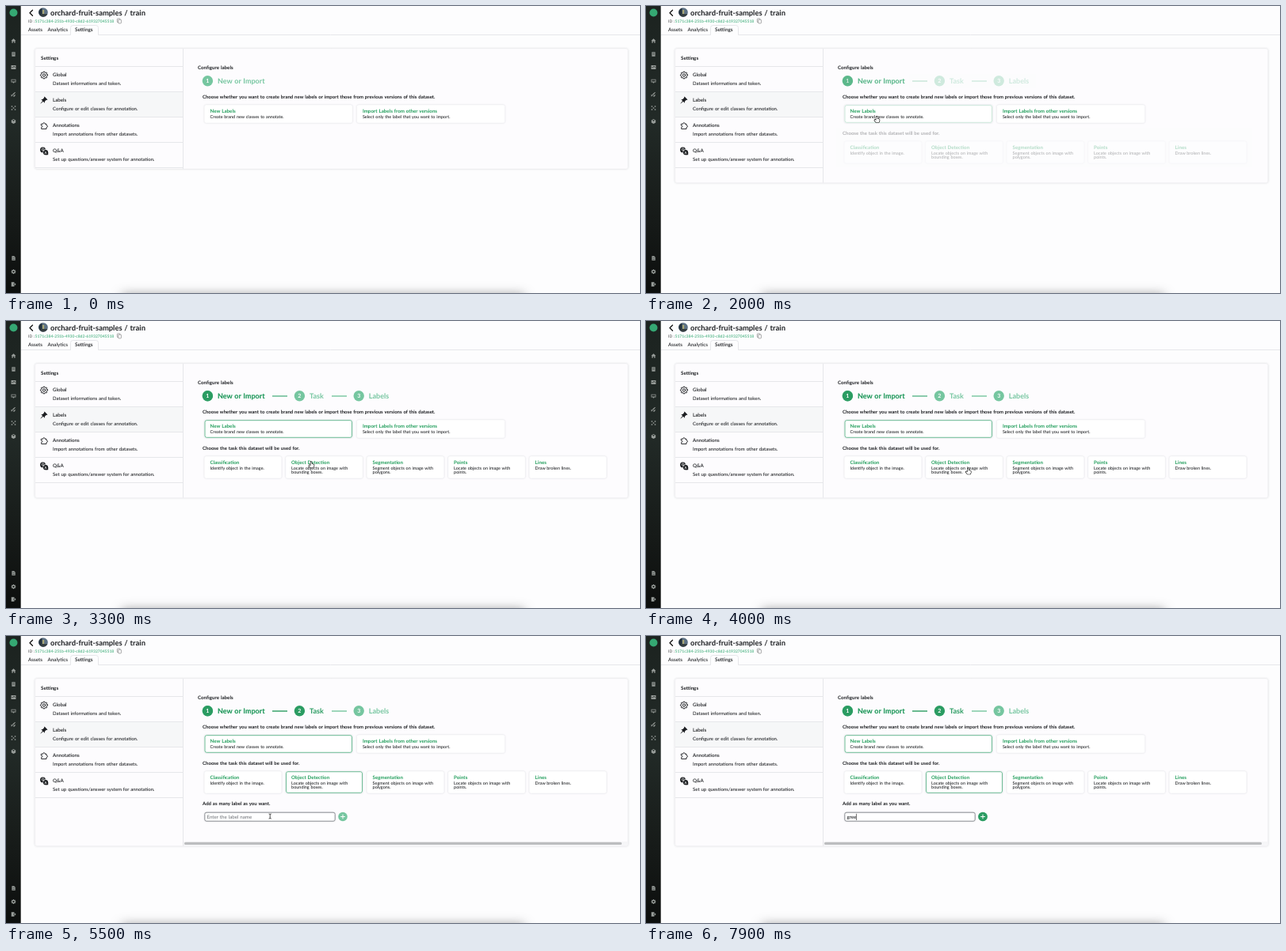
An HTML page with a canvas for the animation above (8 s loop, 800 by 363 pixels).

```html
<!DOCTYPE html>
<html lang="en">
<head>
<meta charset="utf-8">
<title>Label setup</title>
<style>
html, body { margin: 0; width: 100%; height: 100%; overflow: hidden; background: #fdfdfe; }
canvas { display: block; width: 800px; height: 363px; }
</style>
</head>
<body>
<canvas id="stage"></canvas>
<script>
const W = 800, H = 363, LOOP = 8000, TICK = 100;
const INK = '#1c1e21', GREEN = '#2b9c62', PALE = '#76c6a0', LINE = '#e6e7ea', PAPER = '#fdfcfe';
const canvas = document.getElementById('stage');
const ctx = canvas.getContext('2d');
const dpr = window.devicePixelRatio || 1;
canvas.width = W * dpr;
canvas.height = H * dpr;

const clamp = v => Math.max(0, Math.min(1, v));

function setFont(size, weight) {
  ctx.font = `${weight} ${size}px Lato, "Open Sans", sans-serif`;
  ctx.wordSpacing = size * 0.06 + 'px';
}

// y is the middle of the lowercase letters
function text(str, x, y, size = 6.1, weight = 500, color = INK) {
  setFont(size, weight);
  ctx.fillStyle = color;
  ctx.fillText(str, x, y + size * 0.34);
}
const bold = (str, x, y, size = 6.1, color = INK) => text(str, x, y, size, 700, color);

function box(x, y, w, h, r, fill, stroke, lw = 0.8) {
  ctx.beginPath();
  ctx.roundRect(x, y, w, h, r);
  if (fill) { ctx.fillStyle = fill; ctx.fill(); }
  if (stroke) { ctx.strokeStyle = stroke; ctx.lineWidth = lw; ctx.stroke(); }
}

function disc(x, y, r, fill) {
  ctx.beginPath();
  ctx.arc(x, y, r, 0, 7);
  ctx.fillStyle = fill;
  ctx.fill();
}

function line(x1, y1, x2, y2, color = LINE, lw = 1) {
  ctx.beginPath();
  ctx.moveTo(x1, y1);
  ctx.lineTo(x2, y2);
  ctx.strokeStyle = color;
  ctx.lineWidth = lw;
  ctx.stroke();
}

function icon(d, x, y, scale, fill, stroke, lw = 1) {
  const p = new Path2D(d);
  ctx.save();
  ctx.translate(x, y);
  ctx.scale(scale, scale);
  ctx.lineJoin = ctx.lineCap = 'round';
  if (stroke) { ctx.strokeStyle = stroke; ctx.lineWidth = lw; ctx.stroke(p); }
  if (fill) { ctx.fillStyle = fill; ctx.fill(p, 'evenodd'); }
  ctx.restore();
}

function shadowed(blur, color, draw) {
  ctx.save();
  ctx.shadowBlur = blur * dpr;
  ctx.shadowColor = color;
  draw();
  ctx.restore();
}

function faded(alpha, draw) {
  if (alpha <= 0) return;
  ctx.save();
  ctx.globalAlpha = alpha;
  draw();
  ctx.restore();
}

function gearPath(r, teeth) {
  let d = '';
  for (let i = 0; i < teeth * 4; i++) {
    const a = (i - 0.5) / teeth * Math.PI / 2;
    const q = i % 4 < 2 ? r : r * 0.76;
    d += `${i ? 'L' : 'M'}${q * Math.cos(a)} ${q * Math.sin(a)}`;
  }
  const c = r * 0.36;
  return d + `ZM${c} 0A${c} ${c} 0 1 0 ${-c} 0A${c} ${c} 0 1 0 ${c} 0Z`;
}

const sideIcons = [
  [44, 'M0-3L3.2 0H2.3V3H.8V.8H-.8V3H-2.3V0H-3.2Z'],
  [61, 'M-2.3-3H2.3V3H-2.3ZM-1.4-1.6V-.9H1.4V-1.6ZM-1.4.5V1.2H1.4V.5Z'],
  [77.5, 'M-3.2-2.7H3.2V2.7H-3.2ZM-2.3 0L-1 1.2L.5-.8L2.3.5V-.4L.5-1.8L-1 .2L-2.3-.9Z'],
  [95, 'M-3.2-2.5H3.2V1.5H.7V2.6H-.7V1.5H-3.2ZM-2.4-1.7V.6H2.4V-1.7Z'],
  [112, 'M3-3L-.6.8L-1.6-.2L1.4-3ZM-1.9.2L-.9 1.2L-3 3L-3.2 0ZM.2 1L2.8 0L1.6 2.6H-.6Z'],
  [129, 'M-3-3H-1.4V-1.4H-3ZM1.4-3H3V-1.4H1.4ZM-.8-.8H.8V.8H-.8ZM-3 1.4H-1.4V3H-3ZM1.4 1.4H3V3H1.4Z'],
  [146, 'M0-3.2L2.9-1.6V1.6L0 3.2L-2.9 1.6V-1.6ZM0-2.2L-1.7-1.3L0-.4L1.7-1.3Z'],
  [319, 'M-2.3-3H.8L2.4-1.4V3H-2.3ZM-1.2-.5V.1H1.3V-.5ZM-1.2 1.1V1.7H1.3V1.1Z'],
  [336, gearPath(3.3, 8)],
  [352, 'M-3-3H1V-1H.2V1H1V3H-3ZM.6-.5H1.5V-1.8L3.4 0L1.5 1.8V.5H.6Z']
];

function sidebar() {
  const g = ctx.createLinearGradient(0, 0, 0, H);
  g.addColorStop(0, '#1c2320');
  g.addColorStop(0.4, '#222a27');
  g.addColorStop(0.75, '#161a18');
  g.addColorStop(1, '#0c0e0d');
  ctx.fillStyle = g;
  ctx.fillRect(0, 0, 18.7, H);
  disc(9.5, 8.5, 5, '#35a873');
  for (const [y, d] of sideIcons) icon(d, 9.5, y, 0.92, '#989d9a');
}

function avatar() {
  ctx.save();
  ctx.beginPath();
  ctx.arc(47, 8, 5.8, 0, 7);
  ctx.clip();
  ctx.fillStyle = '#5d7184';
  ctx.fillRect(41, 2, 12, 12);
  ctx.fillStyle = '#24323c';
  ctx.fillRect(41, 2, 4.5, 12);
  ctx.fillStyle = '#a9a877';
  ctx.fillRect(46, 5, 2.2, 5);
  ctx.fillStyle = '#353e40';
  ctx.fillRect(44, 10, 9, 4);
  ctx.restore();
}

function header() {
  icon('M33.5 5.3L30 8.8L33.5 12.3', 0, 0, 1, null, '#111', 1.3);
  avatar();
  bold('orchard-fruit-samples / train', 56, 8.8, 9.4);
  text('ID :', 28, 19, 5, 500, '#555');
  bold('5171c384-251b-4930-c8d2-619327045518', 36.5, 19, 5.04, '#5cba8e');
  box(140.3, 16, 3.7, 4.7, 0.7, null, '#888', 0.7);
  box(141.7, 17.2, 3.7, 4.7, 0.7, '#fdfdfe', '#888', 0.7);
  line(19, 36.5, W, 36.5);
  box(81.5, 24.5, 35, 15, 3, '#fdfdfe', LINE, 1);
  ctx.fillStyle = '#fdfdfe';
  ctx.fillRect(80, 37, 38, 4);
  text('Assets', 28, 29.8, 6.3);
  text('Analytics', 52.5, 29.8, 6.3);
  text('Settings', 87, 30, 6.4, 600);
}

const menu = [
  ['Global', 'Dataset informations and token.'],
  ['Labels', 'Configure or edit classes for annotation.'],
  ['Annotations', 'Import annotations from other datasets.'],
  ['Q&A', 'Set up questions/answer system for annotation.']
];

function menuIcons() {
  icon(gearPath(4.6, 8), 48, 87.5, 1, null, INK, 1);
  icon('M.6-4.4L4.4-.6L3.4 0L2.9-.2L.9 1.8L.8 3.6L-1 1.8L-4.2 4.4L-4.4 4.2L-1.8 1L-3.6-.8L-1.8-.9L.2-2.9L0-3.4Z', 48, 119, 1.02, INK);
  icon('M-3.3-2.5H-1.3C-1.8-4.5 1.6-4.5 1.1-2.5H3V-.6C5-1 5 2.1 3 1.7V3.8H-3.3V1.7C-1.6 1.9-1.6-.9-3.3-.6Z', 48, 151.7, 1, null, INK, 0.9);
  disc(46.5, 182, 3.4, INK);
  disc(50, 185.2, 3.6, PAPER);
  disc(50, 185.2, 3.1, INK);
  icon('M50 188.3H53.2V185Z', 0, 0, 1, INK);
  bold('Q', 44.7, 181.9, 4.6, '#fff');
  bold('A', 48.6, 185.1, 4.2, '#fff');
}

function panel(bottom) {
  shadowed(3, 'rgba(40,45,60,.22)', () => box(36.7, 54, 748, bottom - 54, 2.5, PAPER));
  box(36.7, 54, 748, bottom - 54, 2.5, PAPER, '#eeeff1', 0.5);
  ctx.fillStyle = '#f6f7f8';
  ctx.fillRect(37, 109, 186, 31);
  line(223.5, 54, 223.5, bottom);
  for (const y of [76.5, 108.5, 140.5, 172.5, 204.5]) line(37, y, 223, y);
  bold('Settings', 44, 65.7, 6.2);
  menu.forEach(([name, note], i) => {
    text(name, 59, 87 + i * 32, 6.2, 600);
    text(note, 59, 97.6 + i * 32, 6.04);
  });
  menuIcons();
}

function step(n, label, x, color) {
  disc(x, 94.8, 6.7, color);
  ctx.textAlign = 'center';
  bold(n, x, 94.8, 7, '#fff');
  ctx.textAlign = 'left';
  bold(label, x + 12.6, 94.5, 9, color);
}

function card(x, y, w, h, name, notes, picked) {
  shadowed(2, 'rgba(40,45,60,.2)', () => box(x, y, w, h, 2.5, '#fff'));
  box(x, y, w, h, 2.5, '#fff', '#efeff2', 0.5);
  faded(picked, () => box(x + 0.7, y + 0.7, w - 1.4, h - 1.4, 2.2, null, '#5cb48a', 0.9));
  bold(name, x + 7.3, y + 7.8, 6.2, '#229e5c');
  notes.forEach((s, i) => text(s, x + 7.3, y + 14.7 + i * 5.4, 5.48));
}

const tasks = [
  ['Classification', 'Identify object in the image.'],
  ['Object Detection', 'Locate objects on image with', 'bounding boxes.'],
  ['Segmentation', 'Segment objects on image with', 'polygons.'],
  ['Points', 'Locate objects on image with', 'points.'],
  ['Lines', 'Draw broken lines.']
];

function typed(t) {
  return t < 7200 ? '' : t < 7800 ? 'g' : t < 7900 ? 'gre' : 'gree';
}

function labelField(t) {
  const focus = t >= 5200, value = typed(t);
  bold('Add as many label as you want.', 248, 211.6, 6.05);
  shadowed(2, 'rgba(40,45,60,.18)', () => box(250.3, 223, 165.4, 11.5, 2.5, '#fff'));
  box(250.8, 223.2, 164.4, 11, 2.2, '#fff', focus ? '#7b7e85' : '#e3e4e8', focus ? 0.9 : 0.6);
  text(value || 'Enter the label name', 253.5, 228.8, 6.15, 500, value ? INK : '#75787d');
  if (focus && (value || t % 1000 < 500)) {
    const x = 253.6 + ctx.measureText(value).width;
    line(x, 224.8, x, 233, '#333', 0.7);
  }
  disc(425, 228.5, 5.8, PALE);
  faded(clamp((t - 7100) / 400), () => disc(425, 228.5, 5.8, GREEN));
  line(422.2, 228.5, 427.8, 228.5, '#fff', 1);
  line(425, 225.7, 425, 231.3, '#fff', 1);
  ctx.fillStyle = '#f6f6f8';
  ctx.fillRect(224, 260, 560, 4.7);
  box(225, 260.8, 552, 3.2, 1.6, '#bcbdbf');
}

function taskSection(first, second) {
  line(336, 95, 355, 95, second ? GREEN : '#5bb78b', 1.4);
  step('2', 'Task', 370.4, second ? GREEN : PALE);
  line(411, 95, 430, 95, PALE, 1.4);
  step('3', 'Labels', 445.2, PALE);
  bold('Choose the task this dataset will be used for.', 248, 160.6, 6.05);
  tasks.forEach(([name, ...notes], i) =>
    card(250.3, 171, 97.4, 28, name, notes, i === 1 ? second : 0, ctx.translate(i ? 102.5 : 0, 0)));
  ctx.translate(-102.5 * (tasks.length - 1), 0);
  // a thinning veil makes the whole section fade in evenly
  faded(1 - first, () => {
    ctx.fillStyle = PAPER;
    ctx.fillRect(332, 86, 160, 18);
    ctx.fillRect(240, 154, 525, 50);
  });
}

function content(t) {
  const first = clamp((t - 1900) / 300), second = t >= 4100 ? 1 : 0;
  bold('Configure labels', 242, 77.7, 6.2);
  step('1', 'New or Import', 254.4, PALE);
  faded(first, () => step('1', 'New or Import', 254.4, GREEN));
  bold('Choose whether you want to create brand new labels or import those from previous versions of this dataset.', 248, 115.1, 6.03);
  card(250.3, 125, 186.9, 23, 'New Labels', ['Create brand new classes to annotate.'], first);
  card(442.6, 125, 186.9, 23, 'Import Labels from other versions', ['Select only the label that you want to import.'], 0);
  if (first) taskSection(first, second);
  if (second) labelField(t);
}

const path = [
  [100, 531, 36], [900, 323, 139], [1400, 291, 139.7], [2400, 291, 139.7],
  [2700, 316.5, 139.7], [3300, 385, 178], [4000, 406.3, 186.2], [4300, 406.3, 186.2],
  [4700, 336.7, 218.8], [5200, 332, 228], [5400, 333.2, 228]
];

function pointerAt(t) {
  const i = path.findIndex(p => p[0] > t);
  if (i < 0) return path[path.length - 1].slice(1);
  const [t0, x0, y0] = path[i - 1], [t1, x1, y1] = path[i];
  const u = (t - t0) / (t1 - t0), k = u * u * (3 - 2 * u);
  return [x0 + (x1 - x0) * k, y0 + (y1 - y0) * k];
}

const inside = (x, y, l, t, w, h) => x >= l && x <= l + w && y >= t && y <= t + h;

function pointer(t) {
  if (t < 100 || t >= 7200) return;
  const [x, y] = pointerAt(t);
  const onCard = inside(x, y, 250, 125, 187, 23) || inside(x, y, 442.5, 125, 187, 23) ||
    (t >= 2000 && y >= 171 && y <= 199 && x >= 250 && (x - 250) % 102.5 <= 98);
  if (onCard) {
    icon('M-.7.5Q0-.5.7.5V3Q1.5 2.6 1.9 3.3Q2.7 3 3 3.7Q4 3.6 4 4.6V6.2Q3.6 7.4 3 8.3H-.8L-2.9 5.6Q-3.3 4.5-2.3 4.5L-.7 5.7Z', x, y, 0.9, '#fff', '#111', 1.4);
  } else if (t >= 4100 && inside(x, y, 250, 223, 166, 12)) {
    icon('M-1.2-3Q0-3 0-2.3Q0-3 1.2-3M0-2.3V2.3M-1.2 3Q0 3 0 2.3Q0 3 1.2 3', x, y, 1, null, '#222', 0.8);
  } else {
    icon('M0 0V6L1.4 4.8L2.4 7L3.4 6.5L2.5 4.4H4.3Z', x, y, 0.95, '#111', '#fff', 1);
  }
}

function draw(t) {
  ctx.setTransform(dpr, 0, 0, dpr, 0, 0);
  ctx.textRendering = 'geometricPrecision';
  ctx.fillStyle = '#fdfdfe';
  ctx.fillRect(0, 0, W, H);
  header();
  panel(t < 2000 ? 206 : t < 4100 ? 223.5 : 265.5);
  content(t);
  shadowed(13, 'rgba(0,0,0,.36)', () => box(145, 364, 510, 20, 6, '#000'));
  sidebar();
  pointer(t);
}

const start = performance.now();
function frame() {
  const t = (performance.now() - start) % LOOP;
  draw(Math.floor(t / TICK) * TICK);
  requestAnimationFrame(frame);
}
frame();
</script>
</body>
</html>
```
